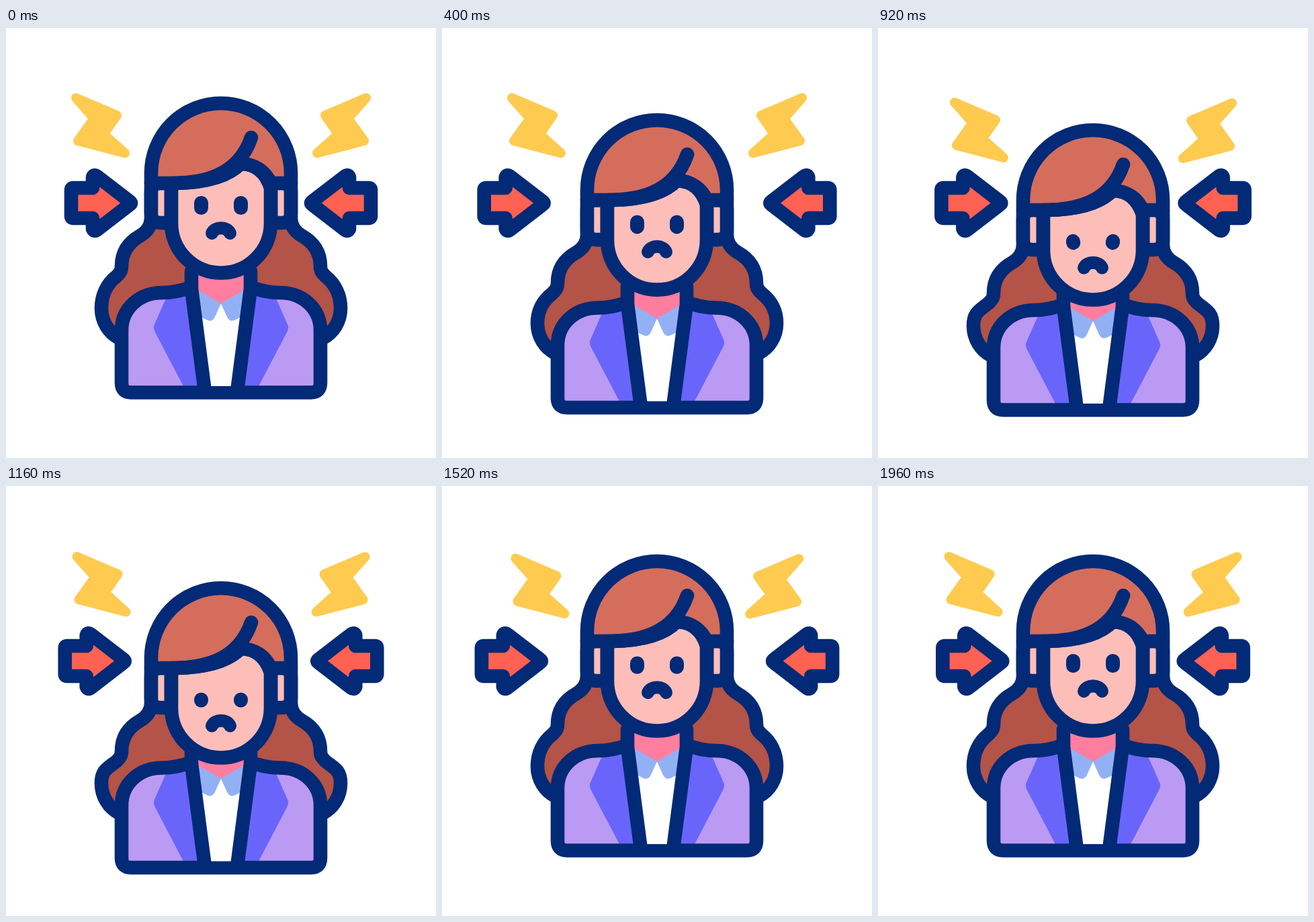
These frames come from a looping animation (640x640 px, 2 s). An HTML page:

```html
<!DOCTYPE html>
<html lang="en">
<head>
<meta charset="utf-8">
<title>Under pressure</title>
<style>
  html, body { margin: 0; width: 100%; height: 100%; overflow: hidden; background: #fff; }
  svg { display: block; width: 100vw; height: 100vh; }
  .line { stroke: #032a76; stroke-width: 20.6; stroke-linecap: round; stroke-linejoin: round; }
  .open { fill: none; }
  .ink { fill: #032a76; }
  .hair { fill: #d56d5c; }
  .curls { fill: #b45347; }
  .skin { fill: #fdbeb9; }
  .neck { fill: #ff7ea0; }
  .shirt { fill: #fff; }
  .collar { fill: #92b1f5; }
  .jacket { fill: #bb9af3; }
  .lapel { fill: #6a65fa; }
  .arrow { fill: #ff6152; }
  .bolt { fill: #fecb50; stroke: #fecb50; stroke-width: 14; stroke-linejoin: round; }
  #mouth { stroke-width: 19; }
</style>
</head>
<body>
<svg viewBox="0 0 640 640">
  <defs>
    <path id="bolt" class="bolt" d="M104 104L165 130L145.500 158L177 186.300L107 168L131 134.500Z"/>
    <path id="coat" d="M276 386C262 390 250 394 232 394C198 394 172 418 172 450V528Q172 542.500 186 542.500H454Q468 542.500 468 528V450C468 418 442 394 408 394C390 394 378 390 364 386"/>
    <path id="lapel" class="lapel" d="M240 398L221.500 440Q218 446 222 453L265 535H296L276 388Z"/>
    <path id="collar" class="collar" d="M282 388L320 410L311 430Q307 438 300 435L286 428Z"/>
    <path id="edge" class="line open" d="M276 362V388L296 541"/>
    <path id="ear" class="line skin" d="M246 231H230Q216 231 216 245V276Q216 290 230 290H246Z"/>
  </defs>

  <g id="boltL"><use href="#bolt"/></g>
  <g id="boltR"><use href="#bolt" transform="translate(640) scale(-1 1)"/></g>

  <path id="curls" class="line curls"/>

  <g id="body">
    <use href="#coat" class="jacket"/>
    <use href="#lapel"/>
    <use href="#lapel" transform="translate(640) scale(-1 1)"/>
    <use href="#coat" class="line open"/>
    <path class="shirt" d="M276 386H364L344 533H296Z"/>
    <path class="neck" d="M276 350H364V392L320 411L276 392Z"/>
    <use href="#collar"/>
    <use href="#collar" transform="translate(640) scale(-1 1)"/>
    <use href="#edge"/>
    <use href="#edge" transform="translate(640) scale(-1 1)"/>
  </g>

  <g id="head">
    <use href="#ear"/>
    <use href="#ear" transform="translate(640) scale(-1 1)"/>
    <path class="line skin" d="M246 231V290.500A74 74 0 0 0 394 290.500V238C387 216 372 202 349 202C328 224 290 231 246 231Z"/>
    <path class="line hair" d="M216 231H246C290 231 328 224 349 202C371 202 386 214 394 231H424V216A104 104 0 0 0 216 216Z"/>
    <path class="line open" d="M246 231C290 231 345 222 365 163"/>
    <g id="eyes">
      <rect id="eyeL" class="ink" rx="10.500"/>
      <rect id="eyeR" class="ink" rx="10.500"/>
    </g>
    <path id="mouth" class="line open" d="M306.500 305.500C311 295 329 295 333.500 305.500"/>
  </g>

  <g id="arrow">
    <path class="line arrow" d="M97 241Q97 238 100 238H129V222Q131 217 136 221L184 258Q188 260.500 184 263L136 300Q131 304 129 299V283H100Q97 283 97 280Z"/>
  </g>
  <use href="#arrow" transform="translate(640) scale(-1 1)"/>
</svg>

<script>
const LOOP = 2000, STEP = 40, MOVE = 333;
const $ = id => document.getElementById(id);
const ease = s => { s = Math.min(1, Math.max(0, s)); return s * s * (3 - 2 * s); };
const ramp = (t, from, length = MOVE) => ease((t - from) / length);
// rises to 1 after `down`, returns to 0 after `up`
const dip = (t, down, up) => ramp(t, down) - ramp(t, up);
// 0 -> 1 -> 0 once per period
const pulse = (t, period) => ease(1 - Math.abs(1 - 2 * (t % period) / period));
const shift = (id, x, y) => $(id).setAttribute("transform", `translate(${x} ${y})`);

// The upper waves follow the head, the tips follow the shoulders.
function curlPath(head, body) {
  const side = flip => {
    const p = (x, y) => `${flip ? 640 - x : x} ${y + (y < 390 ? head : body)}`;
    return [p(216, 231), p(216, 283),
      p(216, 294), p(210, 303), p(200, 309),
      p(182, 319), p(172, 334), p(172, 355),
      p(172, 362), p(169, 365), p(164, 370),
      p(150, 381), p(142, 398), p(142, 417),
      p(142, 437), p(153, 454), p(169, 462)];
  };
  const draw = ([a, b, ...curve]) => `${a}L${b}C${curve.join(" ")}`;
  const [left, right] = [side(false), side(true)];
  return `M${draw(left)}L${right[16]}C${right.slice(1, 16).reverse().join(" ")}L${right[0]}`;
}

function drawEye(id, side, height, tilt) {
  const eye = $(id), x = 320 + side * 29.5, y = 264;
  eye.setAttribute("x", x - 10.5);
  eye.setAttribute("y", y - height / 2);
  eye.setAttribute("width", 21);
  eye.setAttribute("height", height);
  eye.setAttribute("transform", `rotate(${side * tilt} ${x} ${y})`);
}

function draw(t) {
  const body = 26 * dip(t, 144, 1131);
  const head = 40 * dip(t, 205, 1191);
  const face = dip(t, 296, 1277);
  shift("body", 0, body);
  shift("head", 0, head);
  shift("eyes", 0, 14.5 * face);
  shift("mouth", 0, 11.5 * face);
  $("curls").setAttribute("d", curlPath(head, body));

  const squint = ramp(t, 420, 220), relax = ramp(t, 780, 240), widen = ramp(t, 1360, 240);
  const height = 28 - 2.5 * squint - 3.5 * relax + 6 * widen;
  const tilt = 30 * (squint - relax);
  drawEye("eyeL", -1, height, tilt);
  drawEye("eyeR", 1, height, tilt);

  shift("arrow", -38.3 * pulse(t, 1000), 0);
  const jolt = pulse(t, 400);
  shift("boltL", 15.3 * jolt, 10.3 * jolt);
  shift("boltR", -13.8 * jolt, 12 * jolt);
}

const start = performance.now();
function tick(now) {
  const t = Math.max(0, now - start) % LOOP;
  draw(Math.floor(t / STEP) * STEP);
  requestAnimationFrame(tick);
}
draw(0);
requestAnimationFrame(tick);
</script>
</body>
</html>
```
